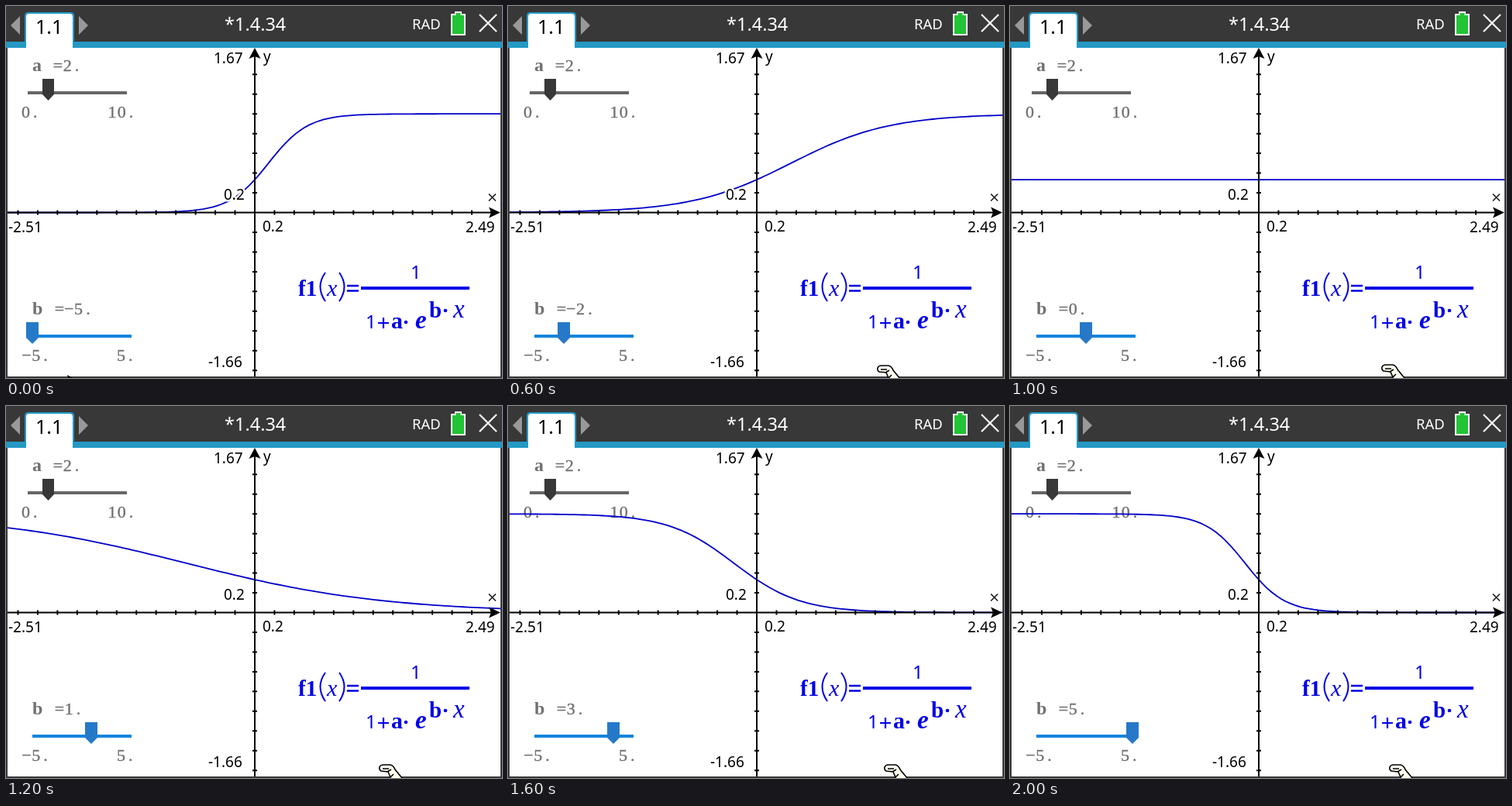
Animation, 640 px wide and 480 px high, one loop 2200 ms. Source, as an HTML page:

```html
<!DOCTYPE html>
<html lang="en">
<head>
<meta charset="utf-8">
<title>Logistic curve with sliders</title>
<style>
  html, body { margin: 0; width: 100%; height: 100%; overflow: hidden; background: #fff; }
  svg { display: block; width: 100vw; height: 100vh; }
  .sans { font-family: "Noto Sans", sans-serif; }
  .serif { font-family: "Liberation Serif", serif; }
  .axis { font-size: 19px; font-weight: 500; }
  .slider { font-size: 22px; fill: #707070; }
  .slider .cells { text-anchor: middle; stroke: #707070; stroke-width: .4; }
  .formula { fill: #0000e6; font-size: 30px; }
  .b { font-weight: bold; }
  .i { font-style: italic; }
</style>
</head>
<body>
<svg viewBox="0 0 640 480">
  <rect width="640" height="480" fill="#fff"/>

  <g class="slider serif">
    <text class="b" x="34" y="84" font-size="24">a</text>
    <text class="cells" data-x="67" y="84">=2.</text>
    <path d="M28 112H156" stroke="#666" stroke-width="4"/>
    <path d="M47 94H62V114L54.5 122L47 114Z" fill="#383838"/>
    <text class="cells" data-x="25.5" y="144">0.</text>
    <text class="cells" data-x="137" y="144">10.</text>

    <text class="b" x="34" y="398" font-size="24">b</text>
    <text class="cells" id="value" y="398"></text>
    <path d="M34 426H162" stroke="#1485dc" stroke-width="4"/>
    <path id="thumb" d="M-8 408H8V428L0 436L-8 428Z" fill="#2679c8"/>
    <text class="cells" data-x="26.5" y="458">−5.</text>
    <text class="cells" data-x="148.5" y="458">5.</text>
  </g>

  <path id="curve" fill="none" stroke="#0000c8" stroke-width="1.8" stroke-linejoin="round"/>

  <g stroke="#000" stroke-width="2">
    <path d="M2 266.5H630M321 60V478"/>
    <path id="ticks"/>
  </g>
  <path d="M321 54L328.500 68L321 65L313.500 68Z"/>
  <path d="M638 266.500L623 259.500L626 266.500L623 273.500Z"/>

  <g class="sans axis">
    <text x="268" y="74">1.67</text>
    <text x="332" y="72" font-weight="400">y</text>
    <text x="281" y="250" stroke="#fff" stroke-width="5" paint-order="stroke">0.2</text>
    <text x="331" y="291">0.2</text>
    <text x="3" y="292">-2.51</text>
    <text x="593" y="292">2.49</text>
    <text x="261" y="466">-1.66</text>
  </g>
  <path d="M623 242.500L632 251.500M632 242.500L623 251.500" stroke="#222" stroke-width="1.7"/>

  <g class="formula serif">
    <text class="b" x="377" y="374" font-size="29">f1</text>
    <text class="i" x="414" y="374">x</text>
    <path d="M412 344Q399 362 412 381M430 344Q443 362 430 381" fill="none" stroke="#0000e6" stroke-width="2"/>
    <path d="M440 361H455M440 367.500H455" stroke="#0000e6" stroke-width="2.400"/>
    <path d="M458 364H598" stroke="#0000e6" stroke-width="4"/>
    <text class="sans" x="522" y="352" font-size="24">1</text>
    <text class="sans" x="464" y="416" font-size="24">1</text>
    <path d="M480 409H494M487 402V416" stroke="#0000e6" stroke-width="2.200"/>
    <text class="b" x="497" y="416">a</text>
    <circle cx="516" cy="408" r="2.300"/>
    <text class="b i" x="528" y="416" font-size="33">e</text>
    <text class="b" x="546" y="402" font-size="29">b</text>
    <circle cx="567" cy="393" r="2.300"/>
    <text class="i" x="577" y="402" font-size="33">x</text>
  </g>

  <rect width="640" height="47" fill="#383838"/>
  <rect y="46" width="640" height="8" fill="#2499c4"/>
  <path d="M0 54H2V478H638V54H640V480H0Z" fill="#383838"/>
  <path d="M24 54V13Q24 8 29 8H83Q88 8 88 13V54Z" fill="#2499c4"/>
  <path d="M26 54V14Q26 10 30 10H82Q86 10 86 14V54Z" fill="#fff"/>
  <path d="M18 13V37L6 25ZM94 13V37L106 25Z" fill="#999"/>
  <g class="sans" fill="#fff">
    <text x="38" y="36" font-size="25" font-weight="500" fill="#000">1.1</text>
    <text x="282" y="32" font-size="23.500">*1.4.34</text>
    <text x="524" y="30" font-size="18.500">RAD</text>
  </g>
  <path d="M579 7H588V10H593V38H574V10H579Z" fill="#fff"/>
  <path d="M580.500 9H586.500V12H591V36H576V12H580.500Z" fill="#22c436"/>
  <path d="M611 11L633 33M633 11L611 33" stroke="#fff" stroke-width="2.200"/>

  <path id="arrow" d="M79 476L86 480H80Z"/>
  <path id="hand" d="M-1 3Q0 0 4 0H13Q17 1 19 6L28 17V24H11L13 16L10 9L1 8Q-2 6 -1 3ZM3 5H11M9 9L14 6M13 16L17 12"
    fill="#fffdf0" stroke="#000" stroke-width="1.600"/>
</svg>
<script>
const STEP = 200, STEPS = 11, A = 2;
const X0 = 321, Y0 = 266.5, UNIT = 127.3;
const $ = id => document.getElementById(id);

// Slider text sits in equal cells, one character each.
const spread = (el, x) =>
  el.setAttribute("x", [...el.textContent].map((_, i) => x + 12.3 * i).join(" "));

function drawTicks() {
  let d = "";
  for (let i = -12; i <= 12; i++) {
    const p = i * UNIT / 5;
    if (i) d += `M${X0 + p} ${Y0 - 3}v6`;
    if (i && Math.abs(i) <= 8) d += `M${X0 - 3} ${Y0 - p}h6`;
  }
  $("ticks").setAttribute("d", d);
}

function curvePath(b) {
  const pts = [];
  for (let px = 2; px <= 638; px += 6) {
    const y = 1 / (1 + A * Math.exp(b * (px - X0) / UNIT));
    pts.push(`${px} ${(Y0 - y * UNIT).toFixed(2)}`);
  }
  return "M" + pts.join("L");
}

function handPos(step) {
  if (step === 2) return [474, 477];
  return [step === 3 ? 478 : 471 + 2 * step, step === 3 ? 464 : 463];
}

let shown = -1;
function draw(now) {
  const step = Math.floor(now / STEP) % STEPS;
  if (step !== shown) {
    shown = step;
    const b = step - 5;
    $("curve").setAttribute("d", curvePath(b));
    $("value").textContent = `=${b < 0 ? "−" : ""}${Math.abs(b)}.`;
    spread($("value"), 69);
    const x = Math.min(158, 2 * Math.round((34 + 12.8 * step) / 2));
    $("thumb").setAttribute("transform", `translate(${x} 0)`);
    $("arrow").style.display = step === 0 ? "" : "none";
    $("hand").style.display = step > 1 ? "" : "none";
    $("hand").setAttribute("transform", `translate(${handPos(step)})`);
  }
}

document.querySelectorAll("[data-x]").forEach(el => spread(el, +el.dataset.x));
drawTicks();
const start = performance.now();
function loop() {
  draw(performance.now() - start);
  requestAnimationFrame(loop);
}
loop();
</script>
</body>
</html>
```
